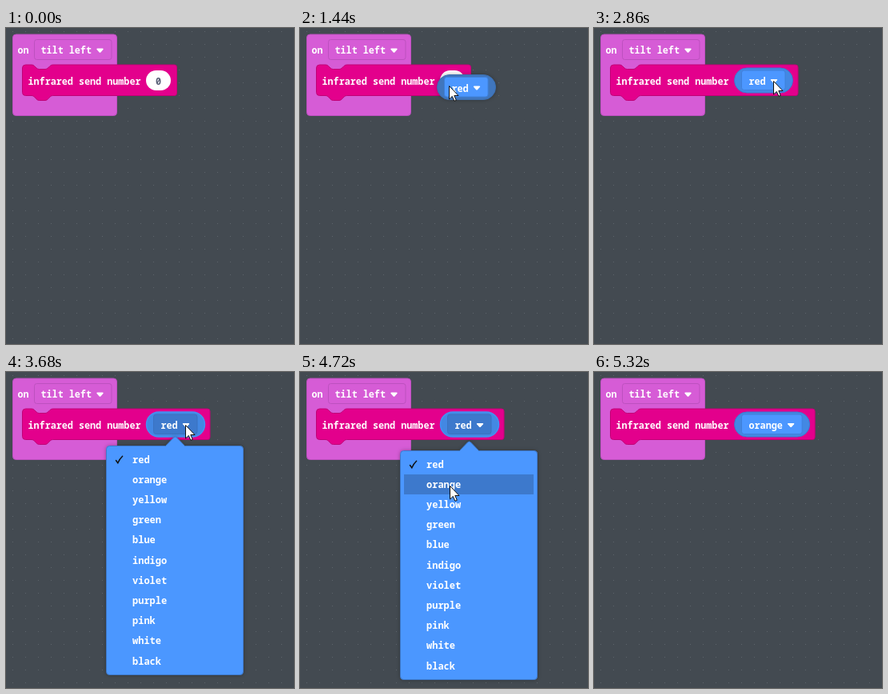
Write an HTML page that moves like this. It is 360 px wide and 395 px high and loops after 5540 ms.

```html
<!DOCTYPE html>
<html lang="en">
<head>
<meta charset="utf-8">
<title>Block editor</title>
<style>
  html, body { margin: 0; width: 100%; height: 100%; overflow: hidden; background: #434a51; }
  svg { display: block; width: 360px; height: 395px; }
  text { font: 600 11.75px "Noto Sans Mono", "DejaVu Sans Mono", monospace; fill: #fff; white-space: pre; }
  #menu text { font-size: 12px; }
  .event { fill: #d65cd6; stroke: #bd50bf; }
  .send { fill: #e3008c; stroke: #c10076; }
  .field { fill: #4c97ff; stroke: #3f80da; }
  .open .field { fill: #3d79cc; stroke: #3a72c0; }
  .pill { fill: #4388e3; stroke: #3c7ad0; }
  .open .pill { stroke: #4592f4; stroke-width: 1.5; }
  .drag .pill { fill: #3f76bd; stroke: #3b6fb2; filter: url(#shade); }
  .panel { fill: #4c97ff; stroke: #3d79cc; }
</style>
</head>
<body>
<svg viewBox="0 0 360 395">
  <defs>
    <pattern id="grid" x="0" y="-4" width="16" height="16" patternUnits="userSpaceOnUse">
      <rect x="8" y="8" width="1" height="1" fill="#5d646b"/>
    </pattern>
    <path id="caret" d="M-3.4 -2.4H3.4Q4.8 -2.2 3.9 -1L.8 2.4Q0 3.1 -.8 2.4L-3.9 -1Q-4.8 -2.2 -3.4 -2.4Z" fill="#fff"/>
    <filter id="shade" x="-15%" y="-40%" width="130%" height="180%">
      <feDropShadow dx="0" dy="0" stdDeviation="2.5" flood-color="#000" flood-opacity=".3"/>
    </filter>
  </defs>
  <rect width="360" height="395" fill="#434a51"/>
  <rect width="360" height="395" fill="url(#grid)"/>

  <rect class="event" x="8.5" y="8" width="130" height="101.5" rx="4"/>
  <text x="14.5" y="32">on</text>
  <rect class="event" x="35.5" y="14.5" width="96.5" height="25" rx="3"/>
  <text x="43.5" y="32">tilt left</text>
  <use href="#caret" x="117.5" y="28"/>

  <path class="send" id="send"/>
  <text x="27.5" y="71">infrared send number</text>
  <g id="slot">
    <rect x="175" y="53" width="31" height="25" rx="12.5" fill="#fff"/>
    <text x="187" y="71" style="fill:#575e75">0</text>
  </g>

  <g id="color">
    <rect class="pill" id="pill" x=".5" y=".5" height="31" rx="15.5"/>
    <rect class="field" id="field" x="9.5" y="3.5" height="24.5" rx="3"/>
    <text id="value" x="18.5" y="21.5"></text>
    <use id="tip" href="#caret" y="16.8"/>
  </g>

  <g id="menu">
    <path class="panel" filter="url(#shade)" d="M129.500 98.500H199.500L209.500 88Q211.500 86 213.500 88L223.500 98.500H292.500Q296.500 98.500 296.500 102.500V380.500Q296.500 384.500 292.500 384.500H129.500Q125.500 384.500 125.500 380.500V102.500Q125.500 98.500 129.500 98.500Z"/>
    <rect id="hover" x="130" width="162" height="25" fill="#3d79cc"/>
    <path d="M137.500 116.500L139.800 119.700Q142 114.500 145.600 111.200" fill="none" stroke="#111" stroke-width="1.5" stroke-linecap="round"/>
  </g>

  <path id="mouse" d="M.5 .5V17L4.300 13.400L6.900 19.300L9.300 18.300L6.800 12.500H12Z" fill="#fff" stroke="#111" stroke-width="1"/>
</svg>
<script>
const $ = id => document.getElementById(id);
const LOOP = 5540, CHAR = 7.05;
const NAMES = "red orange yellow green blue indigo violet purple pink white black".split(" ");
const rowTop = i => Math.floor(i * 25.2);

NAMES.forEach((name, i) => {
  const t = document.createElementNS("http://www.w3.org/2000/svg", "text");
  t.setAttribute("x", 158);
  t.setAttribute("y", 120 + rowTop(i));
  t.textContent = name;
  $("menu").append(t);
});

const drag = (t, x, y) => ({ t, x, y, drag: true });
const drop = (t, x, y) => ({ t, x, y, value: "red" });
const list = (t, x, y, hover = -1, lift = 0) => ({ t, x, y, value: "red", open: 1, hover, lift });

// x, y: pointer tip; lift: upward shift of the menu
const steps = [
  { t: 0 },
  drag(200, -28, 163), drag(400, 80, 131), drag(600, 115, 110), drag(800, 152, 89),
  drag(1020, 171, 79), drag(1220, 178, 75), drag(1440, 186, 72), drag(1620, 187, 71),
  drop(2040, 187, 71), drop(2440, 210, 69), drop(2640, 219, 68), drop(2860, 224, 66),
  list(3680, 224, 66, -1, 6), list(3900, 224, 66), list(4100, 202, 91),
  list(4300, 195, 113, 0), list(4520, 188, 137, 1), list(4720, 187, 142, 1),
  { t: 5120, x: 187, y: 142, value: "orange", open: .08, hover: 1, lift: 16 },
  { t: 5320, value: "orange" }
];

const show = (el, on) => { el.style.display = on ? "" : "none"; };
const move = (el, x, y) => el.setAttribute("transform", `translate(${x} ${y})`);

function sendShape(right) {
  return `M24.500 46H32Q34 46 35.500 47.500L38 50Q39.500 51.500 41.500 51.500H49Q51 51.500 52.500 50L55 47.500Q56.500 46 58.500 46` +
    `H${right - 3}q3 0 3 3V81.500q0 3 -3 3H58.500Q56.500 84.500 55 86L52.500 88.800Q51 90.500 49 90.500H41.500` +
    `Q39.500 90.500 38 88.800L35.500 86Q34 84.500 32 84.500H24.500Q20.500 84.500 20.500 80.500V50Q20.500 46 24.500 46Z`;
}

function draw(s) {
  const value = s.value || "red";
  const extra = (value.length - 3) * CHAR;
  $("send").setAttribute("d", sendShape(s.value ? 255 + extra : 213.5));
  show($("slot"), !s.value);

  show($("color"), s.value || s.drag);
  $("color").setAttribute("class", s.drag ? "drag" : s.open === 1 ? "open" : "");
  $("pill").setAttribute("width", 73 + extra);
  $("field").setAttribute("width", 54.5 + extra);
  $("value").textContent = value;
  $("tip").setAttribute("x", 50 + extra);
  if (s.drag) move($("color"), s.x - 15, s.y - 14);
  else move($("color"), 175, 49.5);

  show($("menu"), s.open);
  $("menu").style.opacity = s.open || 0;
  move($("menu"), 0, -(s.lift || 0));
  show($("hover"), s.hover >= 0);
  $("hover").setAttribute("y", 103 + rowTop(Math.max(0, s.hover || 0)));

  show($("mouse"), s.x !== undefined);
  if (s.x !== undefined) move($("mouse"), s.x, s.y);
}

let last;
function frame() {
  const t = performance.now() % LOOP;
  const step = steps.findLast(s => s.t <= t);
  if (step !== last) draw(last = step);
  requestAnimationFrame(frame);
}
frame();
</script>
</body>
</html>
```
